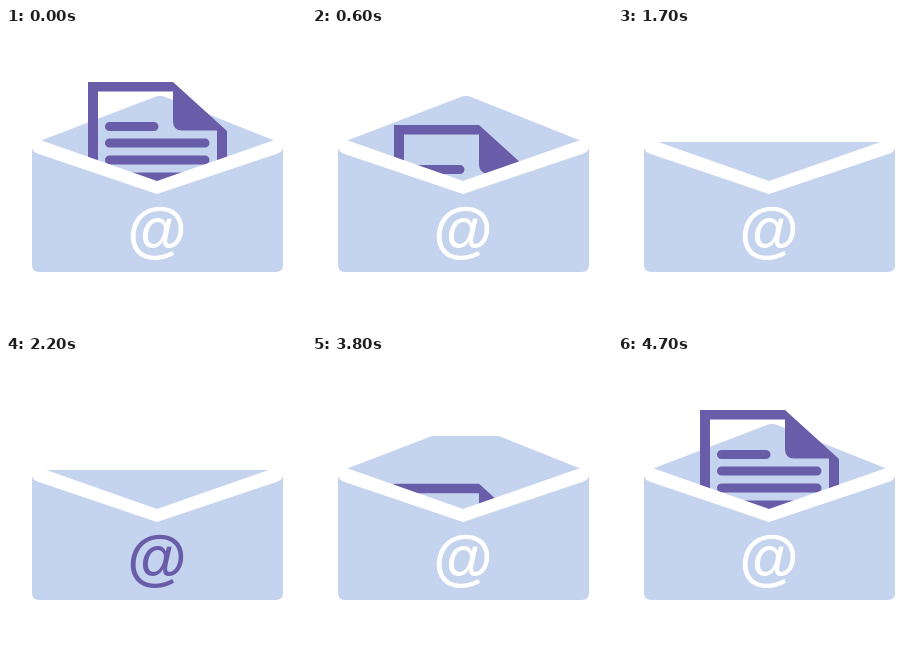
These frames come from a looping animation (300x300 px, 5600 ms). An HTML page:

```html
<!DOCTYPE html>
<html lang="en">
<head>
<meta charset="utf-8">
<title>Envelope</title>
<style>
  html, body { margin: 0; width: 100%; height: 100%; overflow: hidden; background: #fff; }
  svg { display: block; width: 100vw; height: 100vh; }
  .pale { fill: #c5d4ee; }
  .ink { fill: #695ca9; }
  .line { fill: none; stroke: #695ca9; stroke-width: 9; stroke-linecap: round; }
  #at { font: bold 61px "Liberation Sans", Arial, sans-serif; text-anchor: middle; }
</style>
</head>
<body>
<svg viewBox="0 0 300 300">
  <defs>
    <clipPath id="flapClip"><rect id="flapTop" x="0" y="60" width="300" height="140"/></clipPath>
    <clipPath id="paperClip"><rect width="300" height="190"/></clipPath>
  </defs>

  <g clip-path="url(#flapClip)">
    <path class="pale" d="M26 116 L150 68.5 Q154 67 158 68.5 L277 116 L151 165 Z"/>
  </g>

  <g clip-path="url(#paperClip)">
    <g id="paper">
      <path class="ink" d="M82 54 H167 L221 103 V165 H211 V102.500 H176 Q167 102.500 167 93.500 V63.500 H92 V165 H82 Z"/>
      <path class="line" d="M103.500 98.500 H148 M103.500 115 H199 M103.500 132 H199 M103.500 149 H199"/>
    </g>
  </g>

  <path fill="#fff" d="M20 107 L151 153 L283 107 V250 H20 Z"/>
  <path class="pale" d="M26 120 Q27 124 32 125.700 L151 166 L271 125.700 Q276 124 277 120 V237 Q277 244 270 244 H33 Q26 244 26 237 Z"/>
  <text id="at" x="151" y="222">@</text>
</svg>
<script>
  const LOOP = 5600, STEP = 100;

  // Each track is a list of [time, value] points joined by straight lines.
  const tracks = {
    paper: [[75, 0], [1282, 99], [3493, 99], [4700, 0]],
    flap: [[700, 67], [720, 68.900], [1700, 114], [3100, 114], [4070, 67]],
    tint: [[1700, 0], [2200, 1], [2500, 1], [3000, 0]]
  };
  const white = [255, 255, 255], violet = [105, 92, 169];
  const byId = id => document.getElementById(id);
  const paper = byId("paper"), flapTop = byId("flapTop"), at = byId("at");

  function valueAt(points, t) {
    if (t <= points[0][0]) return points[0][1];
    for (let i = 1; i < points.length; i++) {
      const [t0, v0] = points[i - 1], [t1, v1] = points[i];
      if (t <= t1) return v0 + (v1 - v0) * (t - t0) / (t1 - t0);
    }
    return points[points.length - 1][1];
  }

  function draw() {
    const t = Math.floor(performance.now() % LOOP / STEP) * STEP;
    const top = valueAt(tracks.flap, t), tint = valueAt(tracks.tint, t);
    paper.setAttribute("transform", `translate(0 ${valueAt(tracks.paper, t)})`);
    flapTop.setAttribute("y", top);
    flapTop.setAttribute("height", 200 - top);
    at.style.fill = `rgb(${white.map((w, i) => Math.round(w + (violet[i] - w) * tint))})`;
    requestAnimationFrame(draw);
  }
  draw();
</script>
</body>
</html>
```
